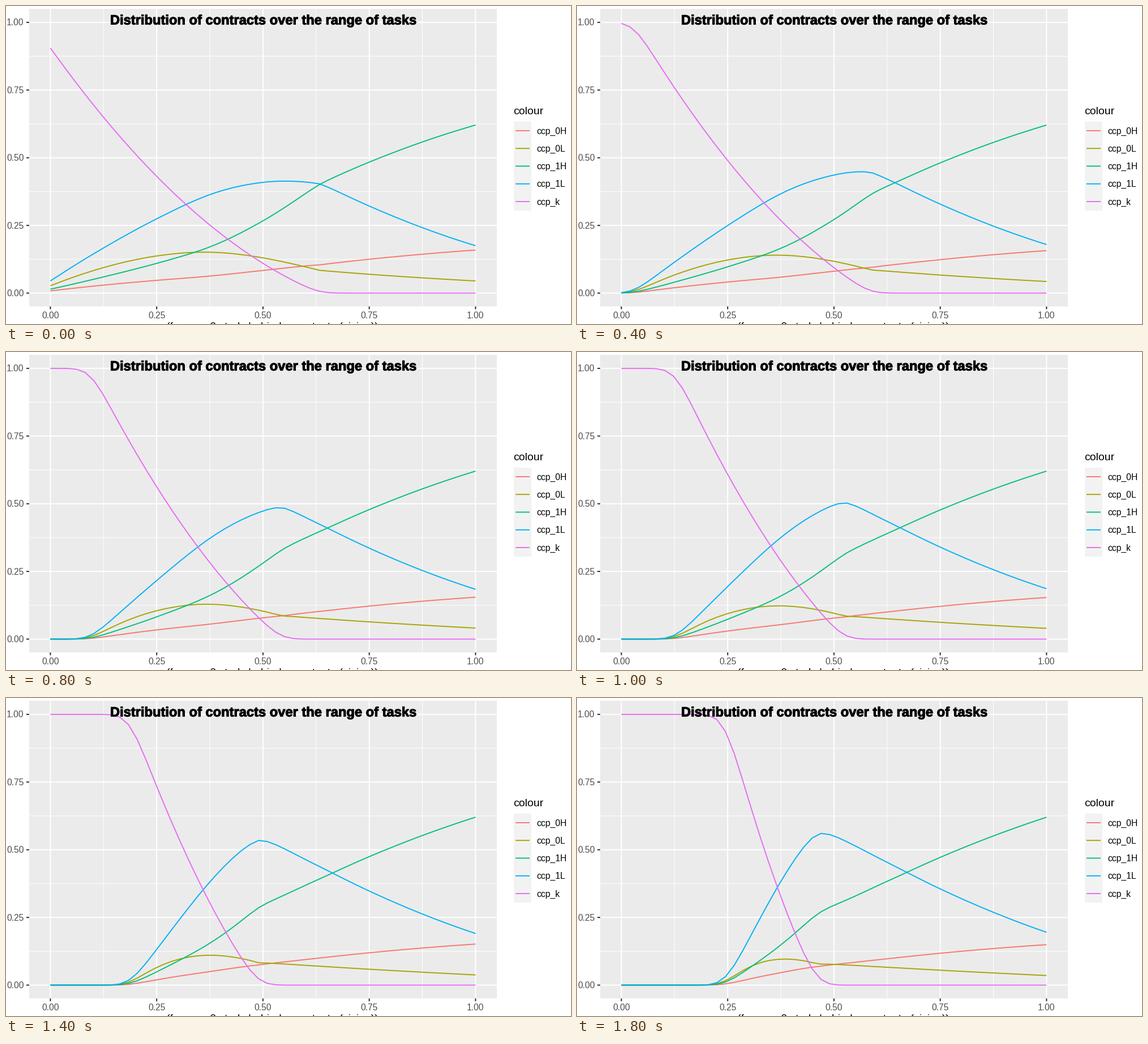
Write a matplotlib script that moves like this. It is 998 px wide and 561 px high and loops after 2 s.

```python
import numpy as np
import matplotlib.pyplot as plt
import matplotlib.patheffects as pe
from matplotlib.animation import FuncAnimation
from matplotlib.patches import Rectangle

W, H, DPI = 998, 561, 128
PT = 72 / DPI                      # points per pixel
FRAMES, INTERVAL = 10, 200

X0, XSPAN = 78.4, 751              # pixel position of the data range
Y0, YSPAN = 506.5, 477.6
LEFT, RIGHT, TOP, BOTTOM = 41, 867, 5, 530

COLOURS = {
    "ccp_0H": "#F8766D",
    "ccp_0L": "#A3A500",
    "ccp_1H": "#00BF7D",
    "ccp_1L": "#00B0F6",
    "ccp_k": "#E76BF3",
}

x = np.linspace(0, 1, 50)
z = np.linspace(-3, 3, 31)
weights = np.exp(-z**2 / 2)
weights /= weights.sum()
SIGMA = 0.024

# Share of high types among all workers, at even steps of the task range
HIGH = np.array([.239, .255, .276, .312, .394, .502, .609, .702, .780])


def hermite(u, ys):
    """Smooth curve through ys at even steps on [0, 1]."""
    n = len(ys) - 1
    i = np.clip(np.floor(u * n).astype(int), 0, n - 1)
    f = u * n - i
    m = np.gradient(ys, edge_order=2)
    return ((2 * f**3 - 3 * f**2 + 1) * ys[i] + (f**3 - 2 * f**2 + f) * m[i]
            + (3 * f**2 - 2 * f**3) * ys[i + 1] + (f**3 - f**2) * m[i + 1])


def shares(t):
    """All five contract shares at step t."""
    start = -.042 + .0355 * t - .00044 * t**2    # capital share leaves 1
    end = .634 - .0252 * t + .00068 * t**2       # capital share reaches 0
    bend = .56 - .05 * t + .0024 * t**2

    # Capital falls along a bent ramp whose corners are rounded
    s = (x[:, None] + SIGMA * z - start) / (end - start)
    k = np.clip(np.maximum(1 - s, 0) * (1 - bend * s), 0, 1) @ weights

    before = np.maximum(end - x, 0)
    after = np.maximum(x - end, 0) / (1 - end)
    high = hermite(x, HIGH) - .0026 * t * (1 - .55 * x**4)
    one_high = (.794 - (.245 + .012 * t) * before
                + (.002 + .0011 * t) * after)
    one_low = (.828 + .0056 * t - (.57 + .028 * t) * before
               + (.39 - .0018 * t**3) * before**2 - .032 * after**1.5)

    labour = 1 - k
    return {
        "ccp_0H": labour * high * (1 - one_high),
        "ccp_0L": labour * (1 - high) * (1 - one_low),
        "ccp_1H": labour * high * one_high,
        "ccp_1L": labour * (1 - high) * one_low,
        "ccp_k": k,
    }


def px(v):
    return X0 + XSPAN * v


def py(v):
    return Y0 - YSPAN * v


fig = plt.figure(figsize=(W / DPI, H / DPI), dpi=DPI, facecolor="white")
ax = fig.add_axes([0, 0, 1, 1])
ax.set_xlim(0, W)
ax.set_ylim(H, 0)
ax.axis("off")


def box(left, top, right, bottom, colour):
    ax.add_patch(Rectangle((left, top), right - left, bottom - top,
                           fc=colour, ec="none", zorder=0))


def segment(xs, ys, colour, width, z=1):
    return ax.plot(xs, ys, color=colour, lw=width * PT, zorder=z, snap=False,
                   solid_capstyle="butt", solid_joinstyle="round")[0]


def label(tx, ty, text, size, colour="black", ha="left", **kw):
    return ax.text(tx, ty, text, fontsize=size * PT, color=colour, ha=ha,
                   va="baseline", family="Liberation Sans", zorder=5, **kw)


# Panel, grid, ticks and axis labels
box(LEFT, TOP, RIGHT, BOTTOM, "#EBEBEB")
for i in range(9):
    v = i / 8
    major = i % 2 == 0
    width = 2 if major else 1
    segment([px(v)] * 2, [TOP, BOTTOM], "white", width)
    segment([LEFT, RIGHT], [py(v)] * 2, "white", width)
    if major:
        segment([px(v)] * 2, [BOTTOM, BOTTOM + 5], "#333333", 2)
        segment([LEFT - 5, LEFT], [py(v)] * 2, "#333333", 2)
        label(px(v), 551, f"{v:.2f}", 15.6, "#4D4D4D", "center")
        label(31.5, py(v) + 5.4, f"{v:.2f}", 15.6, "#4D4D4D", "right")

# Axis title, mostly below the lower edge
label(470, 571, "(for eps=0 study behind on outputs (vision))", 19.4,
      ha="center")

# Legend
label(896.5, 191, "colour", 19.4)
box(897, 204, 928, 360.5, "#F2F2F2")
for i, (name, colour) in enumerate(COLOURS.items()):
    y = 220 + 31.25 * i
    segment([900, 925], [y, y], colour, 1.9)
    label(937, y + 5.4, name, 15.8)

title = label(455, 32.5, "Distribution of contracts over the range of tasks",
              23.7, ha="center", weight="bold")
title.set_path_effects([pe.withStroke(linewidth=1.1 * PT, foreground="black")])

lines = {name: segment([], [], c, 1.9, 3) for name, c in COLOURS.items()}


def update(t):
    for name, v in shares(t).items():
        lines[name].set_data(px(x), py(v))
    return list(lines.values())


anim = FuncAnimation(fig, update, frames=FRAMES, interval=INTERVAL,
                     repeat=True, repeat_delay=0)
plt.show()
```
